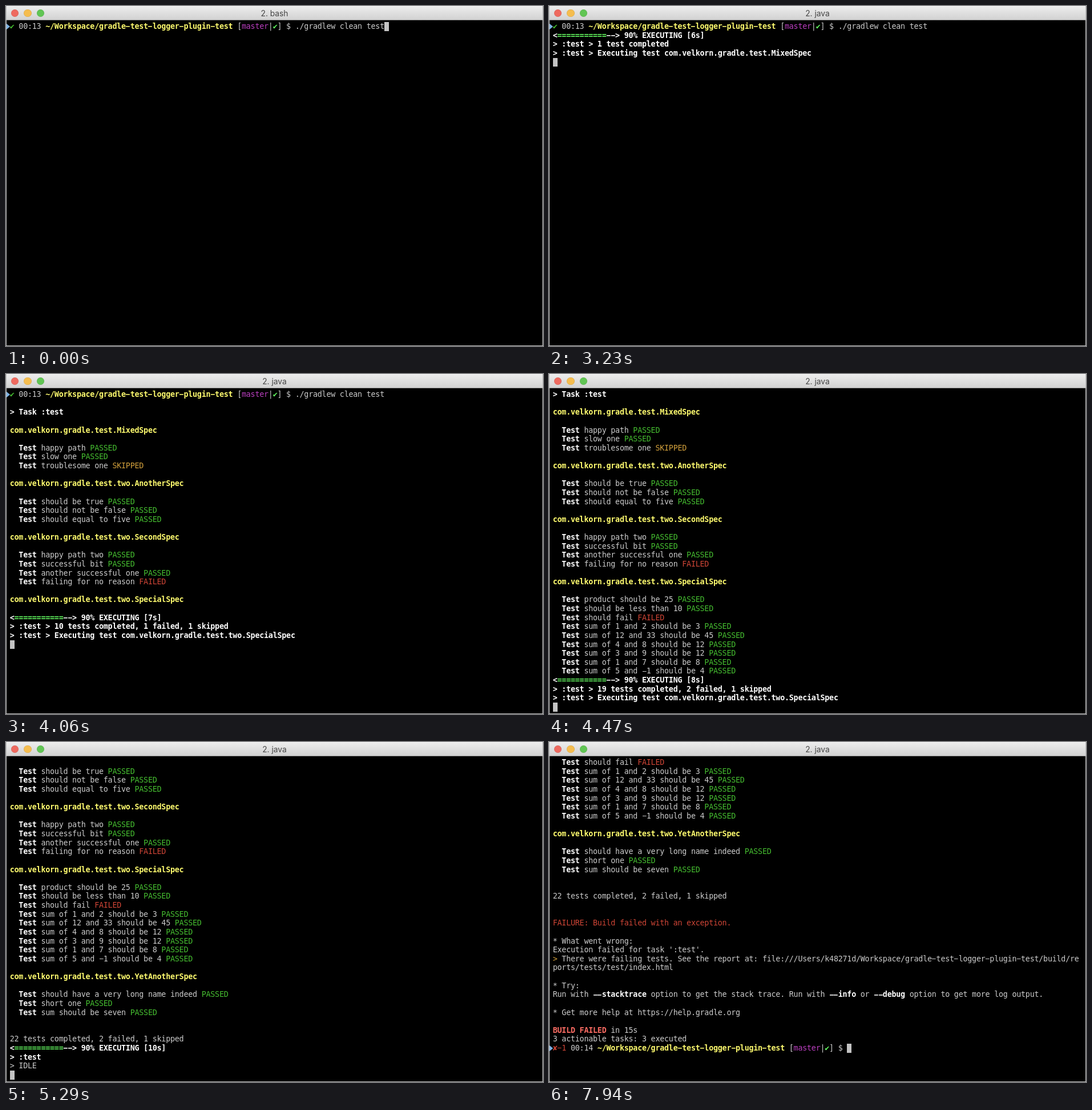
Recreate the animation shown at these times as an HTML page. Size 941x595 px, loop 9 s.

```html
<!DOCTYPE html>
<html lang="en">
<head>
<meta charset="utf-8">
<title>Terminal test run</title>
<style>
html, body { margin: 0; width: 100%; height: 100%; overflow: hidden; background: #000; }
.window { position: relative; width: 941px; height: 595px; box-sizing: border-box; overflow: hidden;
  background: #000; border: solid #c2c2c2; border-width: 0 1px 1px; }
.bar { position: absolute; left: -1px; top: 0; width: 941px; height: 25px; box-sizing: border-box;
  background: linear-gradient(#ececec, #d2d2d2); border-top: 1px solid #f5f5f5; border-bottom: 1px solid #959595; }
.bar u { position: absolute; top: 4.6px; width: 13.4px; height: 13.4px; border-radius: 50%;
  box-shadow: inset 0 0 0 .6px #0002; }
#title { position: absolute; left: 0; width: 100%; top: 0; text-align: center; color: #454545;
  font: 13.8px/24px Inter, Roboto, sans-serif; }
#screen { --cell: 7.8125px; --row: 15.625px; position: absolute; left: 5.7px; top: 28px; color: #cbcbcb;
  font: 13.4px/var(--row) "DejaVu Sans Mono", monospace; font-variant-ligatures: none;
  letter-spacing: calc(var(--cell) - 1ch); }
#screen div { position: relative; height: var(--row); white-space: pre; }
.bold, .lime, .gold, .pink { font-weight: bold; }
.bold { color: #fff; }
.lime { color: #62f85f; }
.gold { color: #fdfa6e; }
.pink { color: #fa6b62; }
.PASSED { color: #45bd30; }
.FAILED { color: #cf4536; }
.SKIPPED { color: #d2a03c; }
.branch { color: #bb3fc0; }
.sign { display: inline-block; width: var(--cell); height: var(--row); vertical-align: top; }
/* wide hyphens */
#screen i { font-style: normal; -webkit-text-fill-color: transparent;
  background: linear-gradient(currentColor 0 0) .6px 7.4px / 6.6px 1.2px no-repeat; }
#screen :is(.bold, .gold) i { background-size: 6.8px 1.6px; }
.cursor { position: absolute; width: var(--cell); height: var(--row); background: #c3c3c3; }
.mark { position: absolute; left: -5.7px; top: 3px; border: solid transparent;
  border-width: 5px 0 5px 6px; border-left-color: #7db2e4; }
</style>
</head>
<body>
<div class="window">
  <div class="bar">
    <u style="left:8.9px;background:#ee6a5f"></u>
    <u style="left:31.2px;background:#f5bd4f"></u>
    <u style="left:53.6px;background:#61c554"></u>
    <div id="title"></div>
  </div>
  <div id="screen"></div>
</div>
<script>
const LOOP = 9000, TICKS_PER_SECOND = 17, ROWS = 36;
const PROJECT = 'gradle-test-logger-plugin-test';
const PACKAGE = 'com.velkorn.gradle.test.';

const paint = (style, text) => `<span class="${style}">${text}</span>`;
const sign = (style, char) => paint('sign ' + style, char);
const bold = text => paint('bold', text);

const prompt = (result, clock) =>
  `<span class="mark"></span>${result} ${clock} ${paint('gold', '~/Workspace/' + PROJECT)} ` +
  `[${paint('branch', 'master')}|${sign('lime', '✔')}] $ `;

// Each test is written as "name STATUS".
const suite = (name, ...tests) => [
  '', { spec: PACKAGE + name }, '',
  ...tests.map(test => {
    const cut = test.lastIndexOf(' ');
    return { name: test.slice(0, cut), status: test.slice(cut + 1) };
  })
];

const command = prompt(sign('PASSED', '✔'), '00:13') + './gradlew clean test';
const nextPrompt = prompt(sign('FAILED', '✘') + paint('FAILED', '-1'), '00:14');

const log = [
  command, '', bold('> Task :test'),
  ...suite('MixedSpec', 'happy path PASSED', 'slow one PASSED', 'troublesome one SKIPPED'),
  ...suite('two.AnotherSpec', 'should be true PASSED', 'should not be false PASSED',
    'should equal to five PASSED'),
  ...suite('two.SecondSpec', 'happy path two PASSED', 'successful bit PASSED',
    'another successful one PASSED', 'failing for no reason FAILED'),
  ...suite('two.SpecialSpec', 'product should be 25 PASSED', 'should be less than 10 PASSED',
    'should fail FAILED', 'sum of 1 and 2 should be 3 PASSED', 'sum of 12 and 33 should be 45 PASSED',
    'sum of 4 and 8 should be 12 PASSED', 'sum of 3 and 9 should be 12 PASSED',
    'sum of 1 and 7 should be 8 PASSED', 'sum of 5 and -1 should be 4 PASSED'),
  ...suite('two.YetAnotherSpec', 'should have a very long name indeed PASSED',
    'short one PASSED', 'sum should be seven PASSED'),
  '', '', '22 tests completed, 2 failed, 1 skipped', '', '',
  paint('FAILED', 'FAILURE: Build failed with an exception.'), '',
  '* What went wrong:',
  "Execution failed for task ':test'.",
  paint('SKIPPED', '>') + ' There were failing tests. See the report at: ' +
    `file:///Users/k48271d/Workspace/${PROJECT}/build/re`,
  'ports/tests/test/index.html', '',
  '* Try:',
  `Run with ${bold('--stacktrace')} option to get the stack trace. ` +
    `Run with ${bold('--info')} or ${bold('--debug')} option to get more log output.`, '',
  '* Get more help at https://help.gradle.org', '',
  paint('pink', 'BUILD FAILED') + ' in 15s',
  '3 actionable tasks: 3 executed'
];

// [tick, log lines printed by then]
const printed = [
  [0, 0], [1, 1], [59, 9], [60, 12], [61, 15], [64, 18], [65, 20], [67, 23], [69, 25],
  [71, 26], [73, 27], [74, 29], [75, 32], [76, 34], [78, 37], [81, 38], [85, 39], [86, 40],
  [90, 43], [129, 59]
];

const format = line =>
  line.spec ? paint('gold', line.spec) :
  line.status ? `  ${bold('Test')} ${line.name} ${paint(line.status, line.status)}` : line;

function progress(percent, phase, tick) {
  const done = Math.floor(percent * 13 / 100);
  const seconds = Math.max(0, Math.floor((tick - 7) / 8));
  return bold('&lt;') + paint('lime', '='.repeat(done)) +
    bold('-'.repeat(13 - done) + `> ${percent}% ${phase} [${seconds}s]`);
}

function summary(lines, tick) {
  const count = status => lines.filter(line => line.status === status).length;
  const failed = count('FAILED'), skipped = count('SKIPPED');
  const total = count('PASSED') + failed + skipped || (tick < 29 ? 0 : 1);
  return `${total} test${total === 1 ? '' : 's'} completed` +
    (failed ? `, ${failed} failed` : '') + (skipped ? `, ${skipped} skipped` : '');
}

// Lines below the log; the cursor follows the last one.
function tail(tick, lines) {
  if (tick < 1) return [command];
  if (tick < 6) return [''];
  if (tick < 7) return [progress(0, 'CONFIGURING', tick), bold('> root project'), ''];
  if (tick < 8) return [progress(0, 'EXECUTING', tick), bold('> :clean'), ''];
  if (tick < 19) return [progress(60, 'EXECUTING', tick), bold('> :compileTestGroovy'), ''];
  if (tick >= 135) return [nextPrompt];
  if (tick >= 130) return [''];
  if (tick >= 129) return [progress(100, 'EXECUTING', tick), '> IDLE', '> IDLE', ''];
  const bar = progress(90, 'EXECUTING', tick);
  if (tick >= 90) return [bar, bold('> :test'), '> IDLE', ''];
  const rows = [bar, bold('> :test > ' + summary(lines, tick))];
  if (tick >= 24) {
    const current = lines.filter(line => line.spec).pop();
    rows.push(bold('> :test > Executing test ' + (current ? current.spec : PACKAGE + 'MixedSpec')));
  }
  return [...rows, ''];
}

const screenBox = document.getElementById('screen');
const titleBox = document.getElementById('title');

function render(tick) {
  const size = printed.filter(([start]) => start <= tick).pop()[1];
  const lines = log.slice(0, size);
  const top = Math.max(0, size + 4 - ROWS);
  const rows = [...lines.slice(top).map(format), ...tail(tick, lines)];
  rows[rows.length - 1] += '<span class="cursor"></span>';
  screenBox.innerHTML = rows.map(row => `<div>${row.replace(/-/g, '<i>-</i>')}</div>`).join('');
  titleBox.textContent = tick < 11 ? '2. bash' : '2. java';
}

let shown = -1;
const start = performance.now();
function frame() {
  const time = (performance.now() - start) % LOOP;
  const tick = Math.floor((time + 6) * TICKS_PER_SECOND / 1000);
  if (tick !== shown) render(shown = tick);
  requestAnimationFrame(frame);
}
frame();
</script>
</body>
</html>
```
